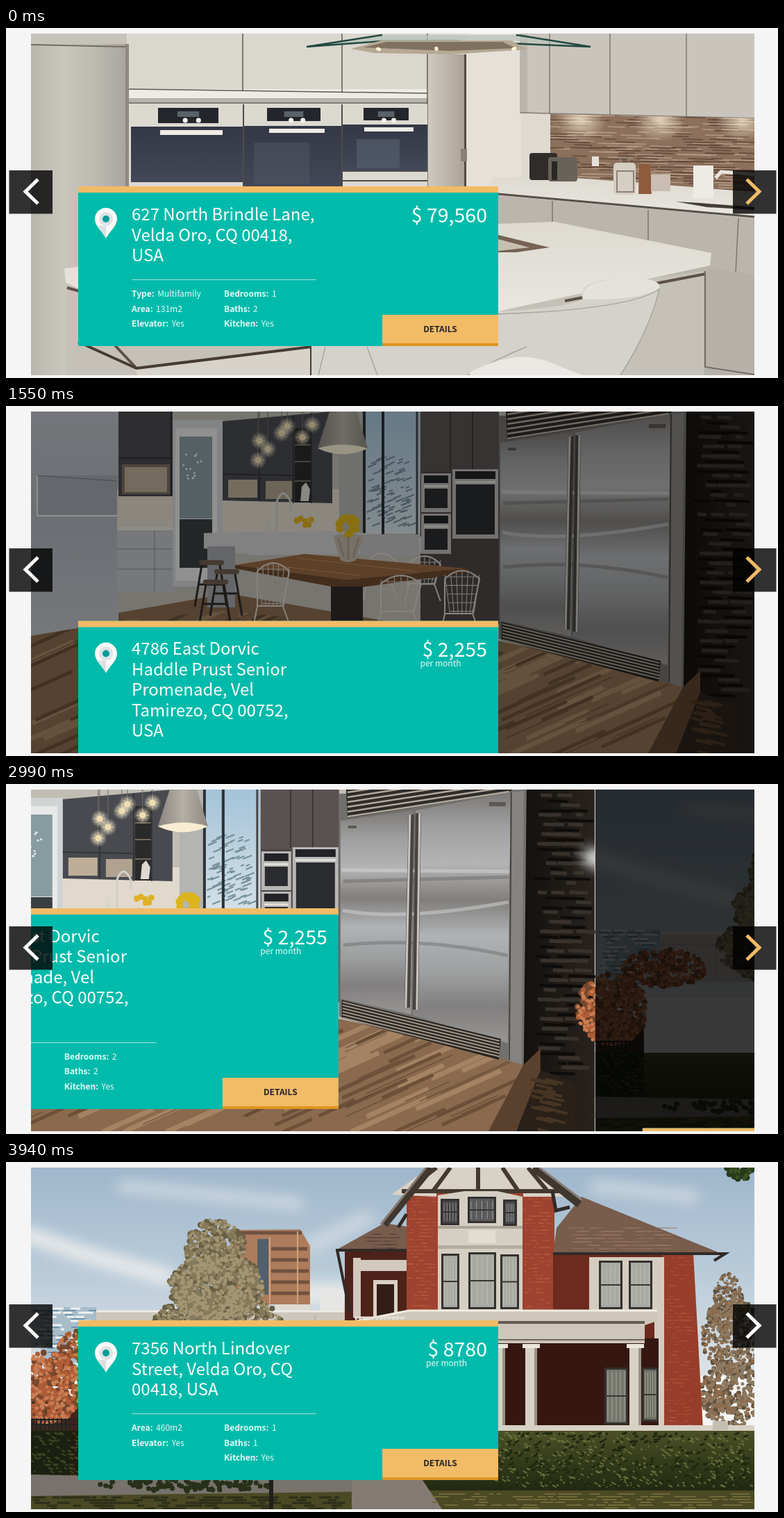
Recreate the animation shown at these times as an HTML page. Size 1112x504 px, loop 4.78 s.

```html
<!DOCTYPE html>
<html lang="en">
<head>
<meta charset="utf-8">
<title>Property slider</title>
<style>
html, body { margin: 0; width: 100%; height: 100%; overflow: hidden; background: #f5f5f5; }
svg { display: block; width: 100%; height: 100%; }
text { font: 12px "Noto Sans CJK JP", "Noto Sans CJK SC", "Noto Sans CJK", "Noto Sans", sans-serif; fill: #e9f9f7; }
.title { font-size: 24px; font-weight: 500; fill: #fff; }
.price { font-size: 28.5px; font-weight: 500; fill: #fff; text-anchor: end; }
.b { font-weight: 700; }
.more { font-weight: 700; fill: #222; text-anchor: middle; }
</style>
</head>
<body>
<svg id="stage" viewBox="0 0 1112 504"></svg>
<script>
const LOOP = 4780, PITCH = 1043, DROP = 350;
const CLICKS = [1200, 2870];
const STEPS = [0, 120, 230, 350, 470, 590, 710, 830, 950, 1070];

let seed = 7;
const rnd = () => (seed = seed * 16807 % 2147483647) / 2147483647;
const rect = (fill, x, y, w, h, more = '') => `<rect fill="${fill}" x="${x}" y="${y}" width="${w}" height="${h}" ${more}/>`;
const shape = (fill, d, more = '') => `<path fill="${fill}" d="${d}" ${more}/>`;
const line = (color, w, d, more = '') => `<path fill="none" stroke="${color}" stroke-width="${w}" d="${d}" ${more}/>`;
const each = (list, fn) => list.map(fn).join('');
const range = (n, fn) => Array.from({ length: n }, (_, i) => fn(i)).join('');
const grad = (id, dir, ...stops) => `<linearGradient id="${id}" ${dir}>` +
  each(stops, (c, i) => `<stop offset="${i / (stops.length - 1)}" stop-color="${c}"/>`) + '</linearGradient>';
const DOWN = 'x1="0" y1="0" x2="0" y2="1"', ACROSS = 'x1="0" x2="1"';

// Round dots spread over an ellipse
const specks = (color, n, cx, cy, rx, ry, size) => line(color, size, range(n, () => {
  const a = rnd() * 6.283, r = Math.sqrt(rnd());
  return `M${(cx + rx * r * Math.cos(a)).toFixed(1)} ${(cy + ry * r * Math.sin(a)).toFixed(1)}h.1`;
}), 'stroke-linecap="round"');

// Short horizontal strokes spread over a box
const dashes = (color, n, x, y, w, h, len, row, thick, slope = 0) => line(color, thick, range(n, () => {
  const px = x + rnd() * (w - len), py = y + Math.floor(rnd() * h / row) * row, l = len * (.3 + rnd() * .7);
  return `M${px.toFixed(1)} ${py.toFixed(1)}l${l.toFixed(1)} ${(l * slope).toFixed(1)}`;
}));

const defs = `<defs>
  <clipPath id="view"><rect x="36" y="8" width="1042" height="492"/></clipPath>
  <clipPath id="splash"><path d="M784 124L1078 130V238L784 215z"/></clipPath>
  <clipPath id="floor"><path d="M36 320L320 295L709 338L975 405L930 500H36z"/></clipPath>
  <filter id="soft" x="-50%" y="-50%" width="200%" height="200%"><feGaussianBlur stdDeviation="9"/></filter>
  <radialGradient id="glow"><stop stop-color="#fff3d8"/><stop offset="1" stop-color="#fff3d8" stop-opacity="0"/></radialGradient>
  ${grad('fridge', ACROSS, '#b9b6ae', '#c9c6be', '#bdbab2', '#aaa69f')}
  ${grad('column', ACROSS, '#cfc9bf', '#aaa196')}
  ${grad('oven', DOWN, '#343846', '#424857')}
  ${grad('counter', DOWN, '#dedad2', '#e9e6df')}
  ${grad('wall', DOWN, '#bfc3ca', '#b3b8c0', '#c3c6cc')}
  ${grad('steel', DOWN, '#807d7a', '#a4a5a6', '#b9b9b9', '#85827f', '#b5b8bb', '#a2a4a5', '#858383', '#9d9b98')}
  ${grad('stone', ACROSS, '#14110e', '#2a241f')}
  ${grad('pane', DOWN, '#a9c9df', '#dbe7ec')}
  ${grad('lamp', ACROSS, '#8d8881', '#bab5ac', '#938d85')}
  ${grad('sky', DOWN, '#9fb7cc', '#b9cbd9', '#dce3e6')}
  ${grad('hedge', DOWN, '#4d5027', '#323a1a', '#202611')}
</defs>`;

const whiteKitchen = () => rect('#dedad2', 36, 8, 1042, 492)
  + rect('#c7c3bb', 36, 8, 138, 15) + rect('url(#fridge)', 36, 23, 137, 477)
  + line('#716c64', 2, 'M36 24L172 27') + rect('#8e8981', 172, 23, 5, 340)
  + rect('#dad7cf', 177, 8, 431, 80) + rect('#eeebe4', 177, 88, 431, 13) + rect('#b8b3aa', 177, 101, 431, 6)
  + line('#5f5a54', 1.5, 'M177 88L607 94M177 108H607M341 8V90M484 8V92M607 8V228')
  + rect('#dcd9d1', 180, 110, 427, 118)
  + rect('url(#oven)', 180, 142, 161, 80) + rect('url(#oven)', 343, 141, 141, 87) + rect('url(#oven)', 485, 139, 122, 67)
  + rect('#596171', 505, 160, 62, 42, 'opacity=".6"') + rect('#555b68', 357, 165, 80, 60, 'opacity=".4"')
  + each([[219, 115, 87, 22], [376, 115, 77, 19], [515, 115, 65, 18]], ([x, y, w, h]) =>
      rect('#24262b', x, y, w, h) + rect('#596169', x + w * .32, y + 5, w * .36, 8)
      + specks('#f4f2ee', 1, x + w * .45, 133, 0, 0, 7) + specks('#f4f2ee', 1, x + w * .67, 133, 0, 0, 7))
  + rect('#eeece6', 222, 147, 90, 7) + rect('#eeece6', 379, 145, 80, 6) + rect('#eeece6', 516, 143, 71, 6)
  + line('#4e4b49', 2, 'M342 110V228M484 110V228M485 206H607M485 220H607')
  + rect('url(#column)', 608, 38, 54, 250) + rect('#584b42', 660, 38, 3, 210) + rect('#8b8077', 655, 174, 9, 18)
  + rect('#e5e1d9', 664, 8, 78, 220)
  + shape('#cac5bc', 'M740 8H1078V130L740 122z') + shape('#bab5ac', 'M740 8H751V122L740 121z')
  + line('#807a72', 1.5, 'M783 8V124M870 8V126M980 8V128M740 122L1078 130')
  + `<g clip-path="url(#splash)">` + rect('#8d705c', 784, 120, 294, 125)
  + dashes('#b39a84', 150, 770, 126, 340, 120, 50, 4, 1.5, .03) + dashes('#654a3c', 170, 770, 128, 340, 118, 50, 4, 1.7, .03)
  + each([828, 942, 1060], x => `<ellipse cx="${x}" cy="132" rx="38" ry="32" fill="url(#glow)" opacity=".75"/>`) + '</g>'
  + shape('url(#counter)', 'M700 216L784 213L1078 236V270L700 238z')
  + shape('#bab6ad', 'M700 240L1078 274V500H700z') + line('#57504a', 3, 'M709 239L1078 272')
  + line('#7b766f', 1.5, 'M787 249V290M925 262V306M1055 274L1045 470')
  + rect('#302c2a', 754, 180, 40, 39, 'rx="4"') + rect('#69625b', 781, 186, 42, 35, 'rx="4"') + rect('#292624', 786, 192, 8, 27)
  + rect('#e6e2da', 844, 185, 10, 14) + rect('#d5cec3', 875, 194, 32, 46, 'rx="5"') + line('#8d8177', 2, 'M880 206H904V236H880zM885 193V187H897V193')
  + shape('#8f5b3d', 'M912 196H928L930 239H911z') + rect('#c9beb1', 929, 211, 28, 24) + rect('#eeebe4', 990, 198, 29, 47)
  + line('#e9e6df', 5, 'M1078 211L1030 207L1022 216') + shape('#433c36', 'M965 250L1000 252L1078 258V262L1010 258z')
  + shape('#bac5bd', 'M433 27L542 10H735L842 26L745 19L535 18z', 'opacity=".8"') + line('#22483f', 2.5, 'M433 27L542 10M735 10L842 27L650 19L540 19L433 27')
  + shape('#b6a894', 'M497 30L540 18H728L751 31L640 38L530 36z') + shape('#80705f', 'M515 28L548 20H715L735 29L640 33z')
  + each([535, 618, 734], x => specks('#fff2d6', 2, x, 30, 4, 1, 5))
  + shape('#c5c1b8', 'M88 360L709 390L1005 350V500H88z')
  + shape('url(#counter)', 'M84 346L709 282L790 279L1016 324L1014 342L709 408L104 375L86 367z')
  + line('#5c5149', 4, 'M1008 354L805 393M88 374L106 379L107 404L188 490')
  + shape('#766252', 'M709 298L783 316L735 323L709 323z') + shape('#c8bfae', 'M709 304L754 316L709 321z')
  + shape('#b5b1a9', 'M1008 344L1078 356V500H1006z') + line('#716a62', 2, 'M1007 350V488L1078 499')
  + shape('#d8d3ca', 'M185 492L440 458V500H190z') + line('#463c35', 4, 'M104 452L188 490L440 459V500')
  + shape('#d5d2cb', 'M440 458H709V408Q800 404 831 391Q820 362 890 361Q946 359 942 376Q930 430 885 500H440z')
  + shape('#e4e2dd', 'M831 391Q824 365 886 361Q945 358 941 375Q915 392 831 391z')
  + line('#aaa59d', 1.5, 'M709 412Q900 405 941 376Q928 433 885 500M665 500Q710 475 750 459M460 459L450 500M520 459L535 500')
  + shape('#eae8e3', 'M668 496Q730 462 780 480L830 500H668z');

const bulbs = [[363, 78], [377, 62], [365, 50], [397, 39], [405, 29], [427, 45], [441, 27]];
const wireChair = (x, y, w, h) => line('#cfcac1', 1.1, range(7, i => `M${x + w * i / 6} ${y + Math.abs(i - 3) * 2}L${x + w * (.15 + i * .115)} ${y + h}`)
  + range(5, i => `M${x + i * 2} ${y + 9 + i * h / 5}H${x + w - i * 2}`))
  + line('#ded9d0', 2, `M${x} ${y + h}V${y + 12}Q${x + w / 2} ${y - 12} ${x + w} ${y + 12}L${x + w * .8} ${y + h}zL${x - 5} ${y + h + 25}M${x + w * .8} ${y + h}l9 25`);

const darkKitchen = () => rect('#c6c2b9', 36, 8, 1042, 492)
  + shape('#8d6d50', 'M36 320L320 270L709 338L1000 400L960 500H36z')
  + '<g clip-path="url(#floor)">' + dashes('#a88766', 75, 0, 270, 1050, 240, 150, 11, 7, -.45)
  + dashes('#6f523b', 75, 0, 270, 1050, 260, 150, 13, 5, -.45) + dashes('#5d432f', 45, 0, 270, 1050, 260, 160, 11, 1, -.45) + '</g>'
  + shape('url(#wall)', 'M36 8H162V310L36 331z') + rect('#a7abb2', 45, 100, 115, 58)
  + line('#eceded', 2, 'M45 158H161M45 100V158') + line('#777b81', 1, 'M45 100L160 108')
  + rect('#e7dfd1', 160, 120, 330, 64) + rect('#4b4b4f', 162, 8, 78, 122) + line('#2e2e31', 1.5, 'M162 75H240M238 8V130')
  + rect('#807264', 167, 84, 69, 43) + rect('#c1b09a', 171, 88, 61, 36)
  + rect('#c4c8cd', 160, 177, 83, 91) + rect('#eceae5', 160, 174, 83, 5) + line('#8a8d91', 1, 'M160 206H243M160 235H243M214 179V266')
  + rect('#d7dadb', 240, 20, 72, 240) + rect('#eff0f0', 244, 32, 60, 220) + rect('#8ba0a4', 250, 44, 47, 118)
  + rect('#3b4142', 250, 163, 47, 70) + specks('#eef7f6', 14, 268, 85, 14, 24, 3)
  + shape('#4a4c51', 'M312 22L470 8V140L312 136z') + line('#2f3033', 1.5, 'M312 98L415 100M365 18V137M414 13V140M440 10V140')
  + rect('#c3b39c', 320, 106, 42, 26) + rect('#b5a792', 374, 108, 38, 26) + rect('#2c2b2b', 416, 32, 23, 107)
  + line('#766d62', 2, 'M416 56H439M416 80H439M416 108H439') + shape('#e4e0d8', 'M424 137L426 116L432 110L438 120L436 137z')
  + rect('#b9b9b6', 480, 8, 117, 180) + rect('url(#pane)', 514, 8, 82, 176) + dashes('#78949f', 80, 518, 78, 76, 100, 14, 5, 2, -.4)
  + line('#2c3136', 4, 'M516 8V185M543 8V185') + line('#45494b', 3, 'M592 8V185')
  + rect('#5c5453', 597, 8, 113, 86) + line('#37312f', 1.5, 'M640 8V92M672 8V92')
  + rect('#4c4746', 597, 94, 113, 220)
  + each([[598, 97, 43, 56], [598, 155, 43, 58], [643, 91, 66, 100]], ([x, y, w, h]) =>
      rect('#bdbcba', x, y, w, h) + rect('#232427', x + 4, y + 3, w - 8, 11) + rect('#2c2d30', x + 5, y + 22, w - 10, h - 28) + rect('#e7e5e1', x + 4, y + 17, w - 8, 3))
  + shape('#d6d7d8', 'M285 183L470 180L598 188V212L360 215L285 205z') + shape('#a7aaae', 'M290 202H330V290H290z') + rect('#c5c6c7', 510, 185, 85, 30)
  + line('#d7d5d0', 3, 'M390 180V138Q399 114 410 138V152') + rect('#dedbd1', 373, 163, 7, 19) + specks('#e4b524', 9, 432, 166, 14, 6, 8)
  + wireChair(520, 212, 42, 40) + wireChair(580, 216, 46, 40)
  + shape('#9b6a43', 'M330 229L430 213L665 234L490 250z') + shape('#704a2e', 'M330 229L490 250L665 234V240L490 264L330 234z')
  + rect('#302c2a', 468, 260, 46, 60) + line('#c58f61', 1, 'M370 228L510 244M420 219L590 238')
  + wireChair(362, 226, 46, 62) + wireChair(540, 244, 58, 52) + wireChair(632, 237, 50, 62)
  + each([[278, 222], [300, 235], [284, 250]], ([x, y]) => rect('#736151', x, y, 36, 7, 'rx="3"') + line('#302b28', 3, `M${x + 4} ${y + 7}l-10 60M${x + 30} ${y + 7}l10 60M${x} ${y + 35}h36`))
  + shape('#c5bbad', 'M471 187Q493 180 515 187L504 222Q493 228 482 222z') + specks('#e2b91d', 16, 493, 172, 16, 13, 11) + line('#a69b8e', 2, 'M478 190L487 218M493 188V222M508 190L500 218')
  + line('#777169', 1, bulbs.map(([x, y]) => `M${x} ${y}V8`).join(''))
  + each(bulbs, ([x, y]) => `<circle cx="${x}" cy="${y}" r="13" fill="url(#glow)"/>` + specks('#ffefbe', 1, x, y, 0, 0, 8)
      + line('#efd9a7', .8, `M${x - 9} ${y}h18M${x} ${y - 9}v18M${x - 6} ${y - 6}l12 12M${x + 6} ${y - 6}l-12 12`))
  + shape('url(#lamp)', 'M466 8H505L521 61Q486 78 449 61z') + shape('#fff4d8', 'M449 61Q486 50 521 61Q486 78 449 61z')
  + rect('url(#stone)', 975, 8, 103, 492) + dashes('#3b332d', 110, 995, 16, 90, 410, 32, 14, 5, .04) + dashes('#0e0c0a', 80, 990, 24, 95, 410, 40, 14, 4, .04)
  + shape('#74736f', 'M710 14L980 8L976 404L710 335z') + shape('#312d2a', 'M720 8H960L955 12L722 49z')
  + line('#b7aea2', 2.5, range(6, i => `M722 ${12 + i * 7}L955 ${-24 + i * 7}`))
  + shape('url(#steel)', 'M712 53L817 38L814 332L712 309z') + shape('url(#steel)', 'M820 38L957 12L953 373L816 333z')
  + line('#d9dbdb', 5, 'M714 124L955 126M715 182Q800 198 954 170', 'opacity=".5"') + line('#5a5755', 5, 'M716 140L955 134M716 232Q830 220 953 247', 'opacity=".35"')
  + line('#494643', 8, 'M814 44L808 322M824 42L820 325') + line('#cecac3', 3, 'M812 44L806 322M826 42L822 325')
  + rect('#605a55', 926, 26, 24, 6) + rect('#605a55', 723, 60, 12, 4)
  + shape('#282420', 'M714 311L943 367L940 397L714 337z') + line('#a49b90', 2, range(6, i => `M715 ${314 + i * 4.5}L941 ${370 + i * 4.5}`))
  + shape('#898783', 'M957 12L976 10L973 404L953 398z') + line('#494641', 2, 'M958 12L955 398')
  + shape('#5d432f', 'M925 500L975 405L1000 381V420L965 500z') + shape('#2a211a', 'M965 500L1000 412L1050 430V500z') + dashes('#493625', 22, 985, 425, 64, 75, 40, 8, 4, .25)
  + line('#292522', 5, 'M520 451L545 464') + specks('#211f1d', 2, 535, 461, 9, 2, 7);

const win = ([x, y, w, h, c = '#a7a9a2']) => rect('#34312f', x, y, w, h) + rect(c, x + 3, y + 3, w - 6, h - 6)
  + line('#d4d1c7', 1, range(5, i => `M${x + 5 + i * (w - 10) / 4} ${y + 6}v${h - 12}`), 'opacity=".55"') + line('#393531', 2, `M${x} ${y + h / 2}h${w}`);

const house = () => rect('url(#sky)', 36, 8, 1042, 300)
  + '<g filter="url(#soft)" fill="none" stroke="#e5e8e9" stroke-linecap="round">'
  + '<path stroke-width="25" d="M30 105L120 135L230 165"/><path stroke-width="32" d="M400 190H490"/><path stroke-width="18" opacity=".6" d="M170 35L420 60M440 120L520 80M850 35L990 50"/></g>'
  + rect('#a8bdca', 50, 209, 80, 80) + dashes('#eef1f2', 65, 38, 211, 96, 72, 16, 6, 3) + dashes('#6c92ad', 50, 38, 214, 94, 70, 12, 6, 2)
  + rect('#dedbd3', 388, 199, 50, 30) + rect('#e5e6e4', 452, 184, 34, 40)
  + shape('#ad7c5c', 'M326 98L424 97L438 121V205H330z') + line('#70513f', 5, 'M326 102H426M382 125H434M382 141H435M382 157H436M382 173H437M382 189H437') + rect('#50606e', 362, 111, 16, 80)
  + line('#d1a27e', 2, 'M380 108V204M420 100V204')
  + rect('#ccc6bb', 130, 215, 365, 70) + line('#eeebe3', 3, 'M130 215H495') + line('#aaa499', 1, 'M130 231H490M210 231V282M445 220V282') + rect('#8f8c86', 432, 232, 11, 47)
  + line('#56462f', 7, 'M306 290L302 190L308 110') + line('#56462f', 2.5, 'M304 230L250 195M304 210L355 180M306 170L280 130')
  + each(['#665d43', '#857a5b', '#a39573'], (c, i) => specks(c, 160, 302, 125, 43, 43, 8 - i * 2) + specks(c, 300, 303, 180, 68, 48, 9 - i * 2) + specks(c, 340, 305, 237, 93, 48, 8 - i * 2))
  + rect('#3a281d', 36, 340, 70, 50)
  + each(['#75472d', '#b05c36', '#c97d52'], (c, i) => specks(c, 180, 60, 325, 50, 52, 9 - i * 2) + specks(c, 100, 135, 265, 60, 27, 8 - i * 2))
  + line('#252322', 2, 'M36 371H106M36 378H106' + range(12, i => `M${38 + i * 6} 369V390`))
  + each(['#60513e', '#8c6c4f', '#8d7b62'], (c, i) => specks(c, 170, 1045, 250, 43, 55, 6 - i) + specks(c, 110, 1040, 205, 22, 45, 5 - i) + specks(c, 130, 1045, 335, 45, 48, 7 - i))
  + rect('#4c2219', 488, 126, 90, 155) + rect('#9e432f', 577, 45, 213, 175) + rect('#6d2a1e', 788, 130, 160, 260) + shape('#973e2a', 'M945 132H990L1004 384H948z')
  + dashes('#b65b43', 120, 577, 52, 46, 165, 10, 5, 1) + dashes('#b65b43', 110, 744, 48, 46, 165, 10, 5, 1) + dashes('#ac523c', 130, 948, 138, 48, 245, 10, 5, 1)
  + shape('#d8d2c5', 'M555 47L610 8H765L818 50H745V42H620V50z') + line('#44392f', 6, 'M585 35L620 8M640 8L615 42M680 8V42M715 8L738 42M752 8L780 42M570 42H800')
  + shape('#785c4c', 'M475 127L545 88L577 93V128z') + shape('#785c4c', 'M829 50L1036 134L788 132L793 95z')
  + dashes('#967560', 75, 805, 95, 170, 36, 25, 5, 1) + dashes('#594538', 35, 515, 104, 60, 22, 18, 5, 1)
  + line('#302a27', 4, 'M475 127H577M788 132H1036L1020 142M477 127L495 215')
  + line('#40372f', 11, 'M545 90L612 8M760 8L826 61') + line('#857970', 3, 'M540 90L605 8M768 8L830 55') + line('#302a27', 5, 'M787 42L792 70L812 65M577 75L565 94')
  + shape('#d5cfc3', 'M622 48L660 42H708L744 50V213H622z') + rect('#aca497', 622, 92, 122, 4) + rect('#b5ada0', 622, 120, 122, 5) + rect('#e2ddd1', 666, 98, 39, 19)
  + each([[626, 53, 27, 38, '#47464a'], [665, 50, 41, 38, '#5b5b5e'], [716, 54, 20, 38, '#47464a'], [627, 132, 26, 80], [666, 130, 40, 82], [712, 133, 27, 79]], win)
  + rect('#d0c9bc', 500, 138, 11, 86) + rect('#d0c9bc', 511, 141, 66, 16) + rect('#d8d1c4', 529, 170, 35, 53) + rect('#321d17', 534, 176, 25, 47)
  + rect('#d4cdbf', 840, 137, 105, 77) + rect('#d4cdbf', 934, 137, 14, 244) + each([[854, 142, 34, 70], [897, 142, 34, 70]], win)
  + rect('#351710', 500, 254, 440, 134) + each([[862, 296, 34, 82, '#75766c'], [916, 296, 24, 78, '#6c6d63']], win)
  + shape('#cec7b9', 'M475 236L580 214H938V229L920 235V261H580L496 280z') + line('#f0ebe0', 3, 'M475 235L580 214H938') + line('#645b50', 4, 'M478 246L582 231H920') + line('#716759', 2, 'M490 272L580 256H920')
  + line('#e5dfd2', 3, 'M502 224H575M502 233H573') + line('#e5dfd2', 2, range(12, i => `M${504 + i * 6} 224V234`))
  + each([597, 702, 748, 898], x => rect('#d8d1c5', x, 264, 17, 122) + rect('#ece6da', x - 4, 262, 25, 6) + rect('#9b9184', x + 13, 268, 4, 116))
  + rect('#d7d1c6', 700, 379, 378, 8) + rect('#c5beb2', 1018, 373, 22, 13)
  + rect('url(#hedge)', 36, 387, 1042, 94) + rect('#1b2111', 36, 387, 70, 65)
  + dashes('#68713b', 380, 700, 389, 378, 80, 6, 4, 2, .6) + dashes('#20290f', 350, 700, 392, 378, 88, 7, 4, 3, -.4) + dashes('#3c4621', 90, 36, 390, 75, 62, 7, 5, 2, .5)
  + rect('#4b4924', 36, 473, 1042, 27) + shape('#77726c', 'M36 450L130 452L500 458L560 474L36 481z') + shape('#837b73', 'M498 458H600L628 500H498z')
  + dashes('#706a36', 130, 610, 478, 470, 22, 20, 4, 2) + dashes('#2c2e18', 130, 36, 483, 460, 18, 20, 4, 3)
  + specks('#273019', 100, 260, 465, 130, 9, 7) + rect('#211f1c', 379, 456, 6, 44)
  + specks('#273b18', 30, 1060, 12, 24, 13, 9) + specks('#3c5320', 18, 1060, 14, 20, 13, 5);

const slides = [
  { scene: whiteKitchen, title: ['627 North Brindle Lane,', 'Velda Oro, CQ 00418,', 'USA'], price: '$ 79,560',
    info: [['Type', 'Multifamily', 'Area', '131m2', 'Elevator', 'Yes'], ['Bedrooms', 1, 'Baths', 2, 'Kitchen', 'Yes']] },
  { scene: darkKitchen, title: ['4786 East Dorvic', 'Haddle Prust Senior', 'Promenade, Vel', 'Tamirezo, CQ 00752,', 'USA'], price: '$ 2,255', rent: 596.5,
    info: [['Type', 'Retail', 'Area', '377m2', 'Elevator', 'Yes'], ['Bedrooms', 2, 'Baths', 2, 'Kitchen', 'Yes']] },
  { scene: house, title: ['7356 North Lindover', 'Street, Velda Oro, CQ', '00418, USA'], price: '$ 8780', rent: 605,
    info: [['Area', '460m2', 'Elevator', 'Yes'], ['Bedrooms', 1, 'Baths', 1, 'Kitchen', 'Yes']] }
];

const facts = (list, x) => range(list.length / 2, i =>
  `<text x="${x}" y="${387 + i * 21.5}"><tspan class="b">${list[i * 2]}:</tspan><tspan dx="4.5">${list[i * 2 + 1]}</tspan></text>`);

function card({ title, price, rent, info }) {
  const top = 228 - 29.5 * (title.length - 3);
  return rect('#00bbab', 104, top, 605, 458 - top) + rect('#f2bb66', 104, top, 605, 9)
    + `<g transform="translate(144 ${top + 47})">`
    + shape('#fafafa', 'M0 28C-4 19-16 11-16 0A16 16 0 0 1 16 0C16 11 4 19 0 28z') + shape('#dcdfdf', 'M0 28C-3 20-9 16-12 10H0z')
    + '<circle r="10" fill="#dfe3e3"/><circle r="5" fill="#009c98"/></g>'
    + each(title, (s, i) => `<text class="title" x="181" y="${top + 49 + i * 29.5}">${s}</text>`)
    + `<text class="price" x="693" y="${top + 52}">${price}</text>`
    + (rent ? `<text x="${rent}" y="${top + 66}">per month</text>` : '')
    + rect('#a5e2dc', 181, 362, 266, 1) + facts(info[0], 181) + facts(info[1], 314)
    + rect('#f2bb66', 542, 413, 167, 45) + rect('#de9522', 542, 454, 167, 4)
    + '<text class="more" x="625.5" y="438">DETAILS</text>';
}

const stage = document.getElementById('stage');
stage.innerHTML = defs + '<g clip-path="url(#view)">'
  + each(slides, s => `<g class="slide">${s.scene()}${rect('#000', 36, 8, 1042, 492, 'class="shade"')}<g class="card">${card(s)}</g></g>`)
  + '</g>' + rect('#000', 4.5, 205, 62.5, 62.5, 'opacity=".8"') + line('#fff', 5, 'M46 218L28 235.5L46 253')
  + rect('#000', 1047, 205, 62.5, 62.5, 'id="next"') + line('#f2bb66', 5, 'M1067 218L1085 235.5L1067 253', 'id="chevron"');

const views = [...stage.querySelectorAll('.slide')].map(el => ({ el, shade: el.querySelector('.shade'), card: el.querySelector('.card') }));
const next = document.getElementById('next'), chevron = document.getElementById('chevron');
const unit = v => Math.min(1, Math.max(0, v));
const smooth = v => v * v * (3 - 2 * v);

function update(t) {
  const from = CLICKS.filter(c => t >= c).length - 1;
  // Motion is held between steps
  const dt = from < 0 ? 2000 : STEPS.filter(s => t - CLICKS[from] >= s).pop();
  const slid = smooth(unit((dt - 38) / 270));
  const rest = unit(1 - dt / 955) ** 2, leave = unit(dt / 710) ** 2;
  views.forEach(({ el, shade, card }, i) => {
    const k = i - from;
    el.style.display = k === 1 && slid > 0 || k === 0 && slid < 1 ? '' : 'none';
    const hidden = k ? rest : leave;
    el.setAttribute('transform', `translate(${(k - slid) * PITCH} 0)`);
    shade.setAttribute('opacity', hidden);
    card.setAttribute('transform', `translate(0 ${hidden * DROP})`);
  });
  const pressed = dt === 0, left = from === 1 && dt === 1070;
  next.setAttribute('fill', pressed ? '#f3bb65' : '#000');
  next.setAttribute('opacity', pressed ? .85 : .8);
  chevron.setAttribute('stroke', pressed || left ? '#fff' : '#f2bb66');
}

const start = performance.now();
function tick() {
  update((performance.now() - start) % LOOP);
  requestAnimationFrame(tick);
}
tick();
</script>
</body>
</html>
```
